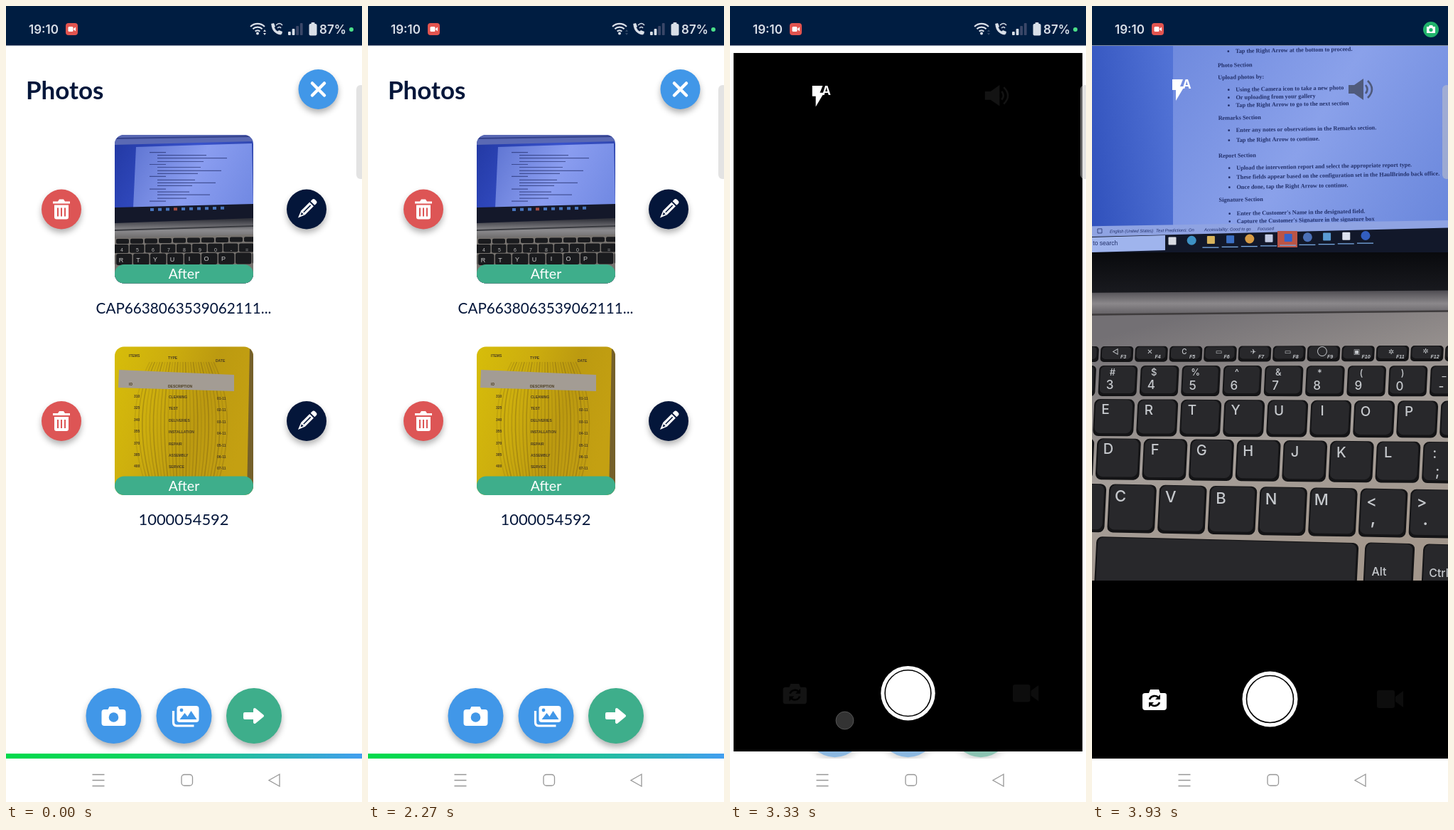
An HTML page with a canvas for the animation above (4000 ms loop, 501 by 1118 pixels).

```html
<!DOCTYPE html>
<html lang="en">
<head>
<meta charset="utf-8">
<title>Photo capture</title>
<style>
html, body { margin: 0; width: 100%; height: 100%; overflow: hidden; background: #fff; }
canvas { display: block; }
</style>
</head>
<body>
<canvas id="stage" width="501" height="1118"></canvas>
<script>
const c = document.getElementById('stage').getContext('2d');
const W = 501, LOOP = 4000, STEP = 1000 / 15;
const NAVY = '#04163a', BLUE = '#4197e8', GREEN = '#3eae8b', RED = '#dd5555';
const clamp = v => Math.max(0, Math.min(1, v));

// Drawing helpers
function rect(x, y, w, h, fill, r = 0) {
  c.fillStyle = fill;
  c.beginPath();
  c.roundRect(x, y, w, h, r);
  c.fill();
}
function disc(x, y, r, fill) {
  c.fillStyle = fill;
  c.beginPath();
  c.arc(x, y, r, 0, 7);
  c.fill();
}
function path(d, fill, stroke, width = 1) {
  const p = new Path2D(d);
  if (fill) { c.fillStyle = fill; c.fill(p); }
  if (stroke) { c.strokeStyle = stroke; c.lineWidth = width; c.stroke(p); }
}
function text(s, x, y, font, fill, align = 'left') {
  c.font = font;
  c.fillStyle = fill;
  c.textAlign = align;
  c.fillText(s, x, y);
}
function at(x, y, draw, angle = 0, scale = 1) {
  c.save();
  c.translate(x, y);
  c.rotate(angle);
  c.scale(scale, scale);
  draw();
  c.restore();
}
function clipped(x, y, w, h, r, draw) {
  c.save();
  c.beginPath();
  c.roundRect(x, y, w, h, r);
  c.clip();
  draw();
  c.restore();
}
function fade(x0, y0, x1, y1, ...colors) {
  const g = c.createLinearGradient(x0, y0, x1, y1);
  colors.forEach((color, i) => g.addColorStop(i / (colors.length - 1), color));
  return g;
}
function mix(a, b, k) {
  const part = (h, i) => parseInt(h.slice(i, i + 2), 16);
  return `rgb(${[1, 3, 5].map(i => Math.round(part(a, i) + (part(b, i) - part(a, i)) * k))})`;
}

// Icons, centred on the origin
function trash() {
  path('M-12-11h7l2-3h6l2 3h7v3h-24z M-10-6h20v17q0 3-3 3h-14q-3 0-3-3z', '#fff');
  path('M-5-2v12 M0-2v12 M5-2v12', null, RED, 2);
}
function pencil() {
  path('M-4-10h8v17l-4 10-4-10z', '#fff');
  rect(-4, -18, 8, 6, '#fff', [3, 3, 0, 0]);
  path('M0-8v14', null, NAVY, 1.6);
  path('M-2 8h4l-2 4z', NAVY);
}
function cross() {
  c.lineCap = 'round';
  path('M-8.500-8.500L8.500 8.500M8.500-8.500L-8.500 8.500', null, '#fff', 4.5);
  c.lineCap = 'butt';
}
function camera() {
  path('M-13-9h5l2-4h12l2 4h5q4 0 4 4v15q0 4-4 4h-26q-4 0-4-4v-15q0-4 4-4z', '#fff');
  disc(0, 2, 6.8, BLUE);
}
function gallery() {
  path('M-15-7v16q0 5 5 5h24', null, '#fff', 3.2);
  rect(-10, -14, 31, 23, '#fff', 4);
  path('M-6 5l7-9 4 5 5-8 8 12z', BLUE);
  disc(-3.5, -8, 2.4, BLUE);
}
function arrow() {
  c.lineJoin = 'round';
  path('M-13-3h14v-6l11 9-11 9v-6h-14z', '#fff', '#fff', 4);
  c.lineJoin = 'miter';
}
function button(x, y, r, fill, icon, angle) {
  c.save();
  c.shadowColor = 'rgba(0,0,0,.3)';
  c.shadowBlur = 9;
  c.shadowOffsetY = 5;
  disc(x, y, r, fill);
  c.restore();
  at(x, y, icon, angle);
}

// Thumbnails
function laptopThumb() {
  rect(153, 181, 195, 210, fade(153, 181, 348, 290, '#2238a2', '#3852cc', '#2a3f9c'));
  path('M153 181H348V190L153 195z', '#5a69b4');
  path('M153 186L348 183', null, '#33418c', 2);
  path('M183 198L346 193 348 280 179 284z', fade(180, 195, 348, 282, '#5f75d2', '#8a9df0', '#7088e2'));
  for (let i = 0; i < 17; i++) {
    const head = i % 4 == 0;
    rect(head ? 202 : 213, 205 + i * 4.3 - (i % 3) * .3, head ? 23 : 40 + i * 29 % 62, 1.2, 'rgba(25,36,95,.6)');
  }
  path('M153 283L348 278V391H153z', '#14182a');
  for (let i = 0; i < 10; i++) rect(203 + i * 11, 284 - i * .25, 5, 4, i == 3 ? '#a34b42' : '#4775bd');
  path('M153 305L348 298V330H153z', fade(0, 300, 0, 330, '#34353d', '#8c8b8e', '#62605f'));
  path('M153 315L348 309', null, '#3b3c41', 2);
  path('M153 326L348 321V391H153z', '#77736f');
  for (let i = -1; i < 11; i++) {
    rect(155 + i * 20, 327 - i * .3, 18, 7, '#1a1b1e', 2);
    rect(152 + i * 22, 335 - i * .2, 20.5, 12, '#1a1b1e', 2);
    rect(155 + i * 24, 348 - i * .2, 22.5, 16, '#1a1b1e', 3);
    text('4567890-='[i] || '', 163 + i * 22, 345, '7px "Liberation Sans", sans-serif', '#bbb', 'center');
    text('RTYUIOP'[i] || '', 162 + i * 24, 360 - i * .4, '9px "Liberation Sans", sans-serif', '#ccc', 'center');
  }
}
function tableThumb() {
  rect(153, 478, 195, 210, fade(153, 500, 348, 560, '#d6bc0a', '#cdae0e', '#bc9a10', '#c4a012'));
  path('M343 478h5v210h-9z', '#75602a');
  for (let i = 0; i < 26; i++) {
    const x = 184 + i * 5, bend = (i - 13) * 1.4;
    path(`M${x - bend} 500Q${x + bend} 570 ${x - bend * .5} 662`, null, `rgba(95,70,20,${.14 + (i % 3) * .08})`, 1.6);
  }
  path('M159 511L321 518V541L158 536z', '#a39c94');
  const small = '600 5px "Liberation Sans", sans-serif', ink = '#4b3d22';
  text('ITEMS', 173, 493, small, ink);
  text('TYPE', 228, 496, small, ink);
  text('DATE', 295, 500, small, ink);
  text('ID', 173, 533, small, ink);
  text('DESCRIPTION', 228, 536, small, ink);
  for (let i = 0; i < 7; i++) {
    const y = 550 + i * 16.4;
    text(310 + i * 15, 180, y, small, ink);
    text(['CLEANING', 'TEST', 'DELIVERIES', 'INSTALLATION', 'REPAIR', 'ASSEMBLY', 'SERVICE'][i], 229, y + 1, small, ink);
    text('0' + (i + 1) + '-11', 297, y + 3, small, ink);
  }
}
function photoCard(y, thumb, name, size) {
  clipped(153, y, 195, 208.5, 13, thumb);
  rect(153, y + 182, 195, 26.5, GREEN, 13);
  text('After', 250.5, y + 202, '19.5px Lato, sans-serif', '#fff', 'center');
  text(name, 250, y + 250.5, size + 'px Lato, sans-serif', NAVY, 'center');
  button(78, y + 104.5, 28, RED, trash);
  button(423, y + 104.5, 28, NAVY, pencil, Math.PI / 4);
}
function photosPage() {
  rect(0, 55, W, 1003, '#fff');
  text('Photos', 28, 131, '700 35px Lato, sans-serif', NAVY);
  button(439.5, 117, 28, BLUE, cross);
  photoCard(181, laptopThumb, 'CAP6638063539062111...', 20.7);
  photoCard(478.5, tableThumb, '1000054592', 21.9);
  button(151.5, 997, 39, BLUE, camera);
  button(250.5, 997, 39, BLUE, gallery);
  button(349, 997, 39, GREEN, arrow);
  rect(0, 1050, W, 7, fade(0, 0, W, 0, '#00da4c', '#0bd45c', '#22bda0', '#429ef0'));
}

// Live camera picture: [indent, baseline, line]
const DOC = [
  [1, 66, 'Tap the Right Arrow at the bottom to proceed.'],
  [0, 86, 'Photo Section'],
  [0, 103, 'Upload photos by:'],
  [1, 120, 'Using the Camera icon to take a new photo'],
  [1, 131, 'Or uploading from your gallery'],
  [1, 142, 'Tap the Right Arrow to go to the next section'],
  [0, 160, 'Remarks Section'],
  [1, 177, 'Enter any notes or observations in the Remarks section.'],
  [1, 191, 'Tap the Right Arrow to continue.'],
  [0, 213, 'Report Section'],
  [1, 230, 'Upload the intervention report and select the appropriate report type.'],
  [1, 243, 'These fields appear based on the configuration set in the HaulBrindo back office.'],
  [1, 257, 'Once done, tap the Right Arrow to continue.'],
  [0, 275, 'Signature Section'],
  [1, 294, "Enter the Customer's Name in the designated field."],
  [1, 305, "Capture the Customer's Signature in the signature box"]
];
// Key rows: first label x, pitch, top, height, label size, labels
const ROWS = [
  [19, 61, 552, 51, 19, 'ERTYUIOP'],
  [23, 65.6, 607, 57, 20, 'DFGHJKL;'],
  [40, 70.7, 671, 67, 22, 'CVBNM<>']
];
const SANS = '"Liberation Sans", sans-serif';

function liveView(k) {
  const tone = (a, b) => mix(a, b, clamp(k));
  const ink = tone('#1f2540', '#22306a');
  const keyFill = tone('#1d1914', '#28282b'), label = tone('#a9a08c', '#c6c9cd');
  // Lower rows tilt down more towards the right
  const tilt = (x, y) => y + x * (y - 500) * .0001;
  function key(x, y, w, h, r = 6) {
    c.save();
    c.transform(1, (y - 500) * .0001, -.05, 1, .05 * y, 0);
    rect(x - .5, y, w + 1, h + 1, tone('#0d0b08', '#141416'), r);
    rect(x + 1.5, y + 1, w - 4, h - 4, keyFill, r);
    c.restore();
  }
  const mark = (s, x, y, size) => text(s, x, tilt(x, y), `500 ${size}px Inter, "DejaVu Sans", sans-serif`, label, 'center');

  // Screen
  rect(-40, 30, 600, 330, fade(-20, 200, 125, 180, tone('#34498f', '#2f50bb'), tone('#5f73b6', '#5273d6')));
  path('M114 30H560V306L114 309z', fade(114, 56, 500, 300, tone('#8090c2', '#6f8ade'), tone('#a5b2d8', '#8aa1ea'), tone('#8496c8', '#6a87dc')));
  DOC.forEach(([indent, y, line]) => at(177 + (y - 80) * .008 + indent * 25, y, () => {
    text(line, 0, 0, '700 8.3px "Liberation Serif", serif', ink);
    if (indent) disc(-10, -2.5, 1.4, ink);
  }, -.018));
  path('M-40 310L560 300V318L-40 328z', tone('#a6aec8', '#8fa3e2'));
  at(8, 319, () => {
    c.strokeStyle = ink;
    c.lineWidth = .8;
    c.strokeRect(0, -6, 6, 6);
    ['English (United States)', 'Text Predictions: On', 'Accessibility: Good to go', 'Focused'].forEach((s, i) =>
      text(s, [17, 82, 150, 225][i], 0, 'italic 6px ' + SANS, ink));
  }, -.018);
  path('M-40 325L560 310V480H-40z', tone('#0e1016', '#12182a'));
  path('M-40 326L103 322V343L-40 347z', tone('#a9b3cd', '#9fb4ed'));
  text('here to search', -18, 336, '8.5px ' + SANS, ink);
  const apps = ['#d8dbe3', '#3d91c4', '#d7b35c', '#3b6fc4', '#d69b45', '#c2cbe4', '#3562c9', '#4b70b8', '#5a9bd4', '#dde2ee', '#325ec0'];
  rect(261, 316, 28, 23, tone('#a84c32', '#bb5546'));
  apps.forEach((color, i) => {
    const x = 113 + i * 27.2, y = 330 - i * .75;
    i % 3 == 1 ? disc(x, y, 6.5, color) : rect(x - 5.5, y - 5.5, 11, 11, color, 1);
    if (i > 1) rect(x - 12, y + 10, 23, 1.3, '#78a9e2');
  });

  // Bezel, hinge and deck
  rect(-40, 346, 600, 60, fade(0, 346, 0, 406, '#090a0d', tone('#12110f', '#1a1b20')));
  path('M-40 403L560 399V440H-40z', fade(0, 400, 0, 436, tone('#3f3727', '#504e53'), tone('#736850', '#8b888b'), tone('#4a4231', '#5c595d')));
  path('M-40 435L560 429V850H-40z', fade(150, 430, 250, 806, tone('#5b503a', '#737074'), tone('#857650', '#a59e99'), tone('#8a7b52', '#a3978c')));
  path('M-40 434L560 428', null, tone('#2d271d', '#3f3c3d'), 2.5);

  // Keyboard
  for (let i = -1; i < 11; i++) {
    const x = 33 + i * 48.5;
    key(x - 20, 478, 45, 21, 5);
    if (i >= 0) {
      mark('◁✕C▭✈▭◯▣✲✲'[i] || '', x, 489, 10);
      text('F' + (i + 3), x + 7, 495, 'italic 700 7px ' + SANS, label);
    }
    const n = 25 + i * 58.3;
    key(n - 14, 505, 53, 42);
    mark('#$%^&*()_'[i] || '', n + 4, 519, 13);
    mark('34567890-'[i] || '', n, 538, 17);
  }
  ROWS.forEach(([x0, pitch, y, h, size, labels]) => {
    for (let i = -1; i < 9; i++) {
      const x = x0 + i * pitch, s = labels[i] || '';
      key(x - 15, y, pitch - 5, h, 8);
      mark(s == ';' ? ':' : s, x, y + size + 2, size);
      if (s == ';') mark(s, x + 4, y + 46, size);
      if (s == '<') mark(',', x + 2, y + 48, size + 4);
      if (s == '>') mark('.', x + 5, y + 48, size + 4);
    }
  });
  key(-80, 746, 76, 90, 8);
  key(7, 745, 368, 90, 8);
  key(385, 744, 69, 90, 8);
  key(467, 744, 90, 90, 8);
  mark('Alt', 404, 788, 16);
  mark('Ctrl', 488, 788, 16);
}

// Camera screen
const DIM = 'rgba(34,34,34,.55)', FAINT = '#0d0d0d';
function flipIcon(fill) {
  path('M-13-9h5l2-5h12l2 5h6q3 0 3 3v17q0 4-4 4h-26q-4 0-4-4v-17q0-3 4-3z', fill);
  path('M-7 0A7.500 7.500 0 0 1 6-2 M7 4A7.500 7.500 0 0 1-6 6', null, '#000', 2.6);
  path('M8-7v7h-7z M-8 11v-7h7z', '#000');
}
function cameraScreen(t) {
  rect(0, 56, W, 1001, '#000');
  const live = t > 3520;
  if (live) clipped(0, 56, W, 751, 0, () => {
    const k = (t - 3600) / 333, rest = 1 - k;
    c.translate(250 + 9 * rest, 550);
    c.rotate(.01 * rest);
    c.scale(1 + .01 * rest, 1 + .01 * rest);
    c.translate(-250, -550);
    liveView(k);
  });
  path('M113 103h15l-4 10h6l-12 20v-15h-5z', '#fff');
  text('A', 127, 116, '700 17px Inter, sans-serif', '#fff');
  path('M361 111h8l13-9v30l-13-9h-8z', DIM);
  path('M385 111q5 6 0 12 M388 105q12 12 0 24', null, DIM, 2.6);
  at(88, 974, () => flipIcon(live ? '#fff' : '#131313'));
  rect(401, 961, 25, 25, FAINT, 3);
  path('M427 970l11-8v23l-11-8z', FAINT);
  disc(250.5, 973.5, 39, '#fff');
  c.strokeStyle = '#000';
  c.lineWidth = 1.6;
  c.beginPath();
  c.arc(250.5, 973.5, 33, 0, 7);
  c.stroke();
}

// System bars
function statusBar(t) {
  rect(0, 0, W, 55.5, '#001d41');
  const font = '600 17px Inter, sans-serif', ink = '#d9dfe8';
  text('19:10', 32, 38.5, font, ink);
  rect(84, 24, 17, 17, '#e2544f', 4);
  rect(87.500, 29, 7, 7, '#fff', 1.5);
  path('M95 32l3-2.500v6l-3-2.500z', '#fff');

  c.save();
  c.globalAlpha = clamp(1 - (t - 3533) / 190);
  for (let i = 1; i < 4; i++) {
    c.strokeStyle = ink;
    c.lineWidth = 2.2;
    c.beginPath();
    c.arc(354, 39, i * 4.7, -2.35, -.79);
    c.stroke();
  }
  disc(354, 38.5, 2, ink);
  const busy = t < 1260 || (t > 2320 && t < 3250);
  path('M362 36l2-3 2 3z M362 38l2 3 2-3z', busy ? ink : '#344a68');
  path('M375 26q1 11 12 13', null, ink, 3.2);
  path('M373 25l4-1 2 5-3 2z M382 36l2-2 5 2-1 4z', ink);
  path('M380 27q5-5 9 0 M382 31q3-3 5 0', null, ink, 1.5);
  for (let i = 0; i < 4; i++) rect(397 + i * 5.6, 36 - i * 4, 3.8, 5 + i * 4, i < 2 ? ink : '#3a4768', 1);
  rect(429.5, 23, 5, 3, ink, 1);
  rect(426.5, 25, 11, 16.500, ink, 2);
  text('87%', 441, 38.5, font, ink);
  c.restore();

  const grow = Math.sqrt(clamp((t - 3533) / 200));
  at(486 - 9 * grow, 33, () => {
    disc(0, 0, 3 + 8 * grow, grow ? '#21b46c' : '#4be08a');
    if (!grow) return;
    c.scale(grow, grow);
    path('M-6-4h3l1-2h4l1 2h3v9h-12z', '#fff');
    disc(0, .5, 2.6, '#21b46c');
  });
}
function navBar() {
  rect(0, 1057, W, 61, '#fff');
  const line = '#969696';
  path('M121.500 1079.500h17 M121.500 1087.500h17 M121.500 1095.500h17', null, line, 1.3);
  c.beginPath();
  c.roundRect(247, 1079.5, 15.5, 15.5, 4);
  c.stroke();
  path('M370 1087.500l15-8.500v17z', null, line, 1.3);
}

function draw(t) {
  rect(0, 0, W, 1118, '#fff');
  const p = clamp((t - 3200) / 200);
  clipped(0, 55, W, 1002, 0, () => {
    const zoom = (scale, alpha, screen) => at(250.5, 556.5, () => {
      c.translate(-250.5, -556.5);
      c.globalAlpha = alpha;
      screen(t);
    }, 0, scale);
    if (p < 1) zoom(1 + .06 * p, 1 - .75 * p, photosPage);
    if (p > 0) zoom(1 - .18 * (1 - p) ** 2, Math.min(1, p * 1.6), cameraScreen);
  });
  statusBar(t);
  navBar();
  rect(493, 111, 12, 132, 'rgba(200,200,200,.5)', 6);
  if (t > 3120 && t < 3390) {
    disc(161.5, 1003.5, 12.5, 'rgba(128,128,128,.4)');
    c.strokeStyle = 'rgba(160,160,160,.4)';
    c.lineWidth = 1;
    c.stroke();
  }
}

function tick(now) {
  const t = now % LOOP;
  draw(Math.floor((t + 4) / STEP) * STEP % LOOP);
  requestAnimationFrame(tick);
}
requestAnimationFrame(tick);
</script>
</body>
</html>
```
